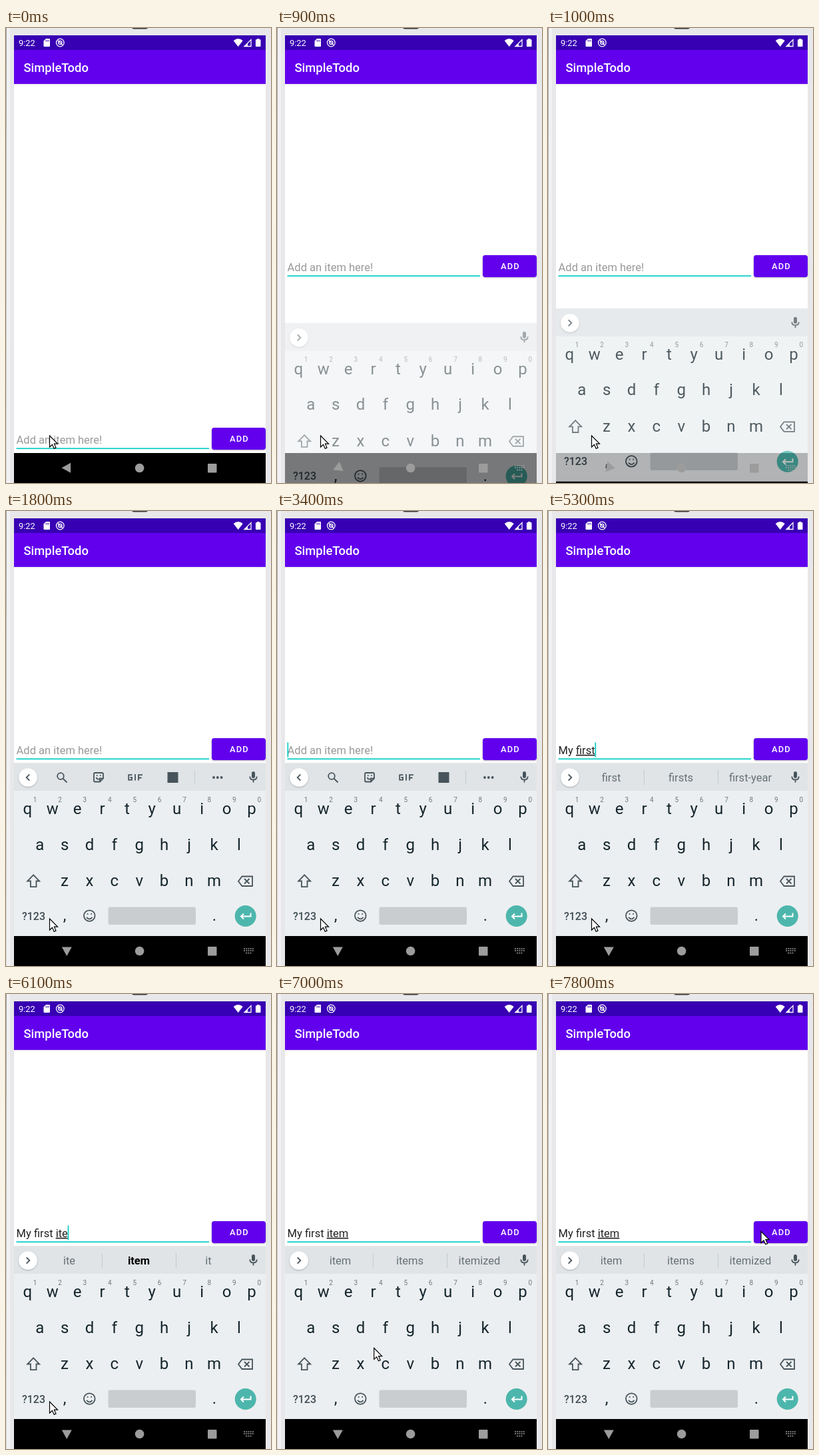
An HTML page that plays this animation: 398 by 683 pixels, repeating every 8 s.

```html
<!DOCTYPE html>
<html lang="en">
<head>
<meta charset="utf-8">
<title>Todo app</title>
<style>
  html, body { margin: 0; width: 100%; height: 100%; overflow: hidden; background: #ededef; }
  svg { display: block; width: 398px; height: 683px; }
  text { font-family: Roboto, sans-serif; white-space: pre; }
  .mid { text-anchor: middle; }
  .field { font-size: 16.5px; }
  .key { font-size: 24px; fill: #14252c; }
  .digit { font-size: 10px; fill: #70777b; }
  .line { fill: none; stroke: #47545b; stroke-width: 1.8; }
  .solid { fill: #47545b; }
  .sep { fill: #c3c9cc; }
</style>
</head>
<body>
<svg viewBox="0 0 398 683">
  <defs>
    <filter id="soft" x="-20%" y="-20%" width="140%" height="150%">
      <feDropShadow dx="0" dy="1" stdDeviation="1" flood-opacity=".28"/>
    </filter>
    <linearGradient id="edge" x2="0" y2="1">
      <stop offset="0" stop-color="#98989b"/>
      <stop offset=".3" stop-color="#b8b8bb"/>
      <stop offset="1" stop-color="#dcdcdf"/>
    </linearGradient>
  </defs>

  <!-- Device frame -->
  <rect width="398" height="683" fill="#f1f1f3"/>
  <rect x="6" width="392" height="683" fill="#e8e8ea"/>
  <rect width="1" height="683" fill="url(#edge)"/>
  <path d="M189 0h24q-1 1.5-4 1.5h-16q-3 0-4-1.5z" fill="#333"/>

  <!-- App -->
  <rect x="12" y="11" width="378" height="627" fill="#fff"/>
  <rect x="12" y="84" width="378" height="2" fill="#000" opacity=".05"/>
  <rect x="12" y="33" width="378" height="51" fill="#6200ee"/>
  <rect x="12" y="11" width="378" height="22" fill="#3700b3"/>
  <text x="26.5" y="65.8" font-size="18.4" font-weight="500" fill="#fff">SimpleTodo</text>
  <g fill="#fff">
    <text x="19" y="27" font-size="12.9">9:22</text>
    <path d="M60 16h5q1 0 1 1v10q0 1-1 1h-7.500q-1 0-1-1v-7.500z"/>
    <path d="M60 18v2.500M62 18v2.500M64 18v2.500" stroke="#3700b3" stroke-width=".9"/>
    <path d="M348.700 28l-7-9q7-6 14 0z"/>
    <path d="M368 17.500v10h-10z" fill="none" stroke="#fff" stroke-width="1.300"/>
    <path d="M363 23v4.500h-5z"/>
    <path d="M377 16h3.500v1.300h1.200q.8 0 .8.800v9.200q0 .8-.8.800h-6q-.8 0-.8-.800v-9.200q0-.8.8-.800h1.300z"/>
    <g fill="none" stroke="#fff" stroke-width="1.300">
      <circle cx="81.300" cy="22" r="5.800"/>
      <circle cx="81.300" cy="22" r="2.600"/>
      <path d="M78 18.500l7 7"/>
    </g>
  </g>

  <g id="entry">
    <rect x="15.500" y="371.300" width="289.500" height="1.800" fill="#10cfc8"/>
    <text id="hint" class="field" x="15.600" y="364.800" fill="#999">Add an item here!</text>
    <text id="typed" class="field" x="15.600" y="364.800" fill="#212121"><tspan id="done"></tspan><tspan id="word" text-decoration="underline"></tspan></text>
    <rect id="caret" y="347.500" width="1.800" height="22" fill="#10cfc8"/>
    <rect x="309" y="341" width="81" height="33" rx="3.700" fill="#6200ee" filter="url(#soft)"/>
    <text x="336" y="362.200" font-size="12.900" font-weight="500" letter-spacing="1.150" fill="#fff">ADD</text>
  </g>

  <rect x="12" y="638" width="378" height="45" fill="#000"/>

  <g id="keyboard">
    <rect x="12" y="378" width="378" height="260" fill="#eceff1"/>
    <rect x="12" y="378.500" width="378" height="41.500" fill="#e0e4e7"/>
    <g id="keys"></g>

    <circle cx="33" cy="400" r="13.800" fill="#fff" filter="url(#soft)"/>
    <path id="chevron" class="line" d="M-2.300-4.600L2.300 0L-2.300 4.600"/>
    <rect class="solid" x="369" y="391" width="5" height="10" rx="2.500"/>
    <path class="line" d="M366.300 398.500q0 5 5.200 5t5.200-5M371.500 403.500v4" stroke-width="1.500"/>

    <g id="tools">
      <circle class="line" cx="82" cy="398" r="4.800"/>
      <path class="line" d="M85.500 401.500l6 6" stroke-width="2"/>
      <path class="line" d="M134 393h10q2 0 2 2v6.500l-5 5h-7q-2 0-2-2v-9.500q0-2 2-2zM146 401.500h-5v5M135.500 400q2 4 5 2" stroke-width="1.600"/>
      <path class="line" d="M136 397h1.500M141 397h1.500"/>
      <path class="line" d="M189.500 396.200h-5.300v7.400h4.800v-3.600h-2.500M194 395v9.600M199 404.600v-8.400h6M199 400.500h4.500" stroke-width="2.200"/>
      <rect class="solid" x="242.500" y="392" width="16" height="16"/>
      <rect class="sep" x="283" y="390" width="1" height="19"/>
      <g class="solid"><circle cx="312" cy="400" r="1.900"/><circle cx="317.800" cy="400" r="1.900"/><circle cx="323.600" cy="400" r="1.900"/></g>
    </g>
    <g id="suggestions">
      <rect class="sep" x="144" y="389" width="1" height="22"/>
      <rect class="sep" x="255" y="389" width="1" height="22"/>
      <text class="mid field" x="95" y="406"></text>
      <text class="mid field" x="199.500" y="406"></text>
      <text class="mid field" x="304" y="406"></text>
    </g>

    <path class="line" d="M41.200 546.300l9 9.200h-4.700v8.700h-8.600v-8.700h-4.700z" stroke-width="1.600"/>
    <path class="line" d="M354.500 548.500h15.500v14.500h-15.500l-5.500-7.250zM358 552l7.500 7.500M365.500 552l-7.500 7.500" stroke-width="1.700"/>
    <text class="mid" x="41.500" y="613.700" font-size="16" font-weight="500" fill="#3f4d54">?123</text>
    <circle class="line" cx="125.300" cy="607.600" r="8.300"/>
    <path class="line" d="M121 609.800q4.300 5 8.600 0M121.700 604.800h1.800M127.200 604.800h1.800" stroke-width="1.700"/>
    <rect x="153.500" y="594.500" width="131.500" height="26.500" rx="2.500" fill="#c9cdd0"/>
    <circle cx="359.700" cy="608" r="16" fill="#4db6ac"/>
    <path d="M367.500 603.500v5h-14.500M357 604.500l-4 4l4 4" fill="none" stroke="#fff" stroke-width="2"/>
  </g>

  <g fill="#9c9c9c">
    <path id="back" d="M-7.700 0L5.800-7.500V7.500z"/>
    <circle cx="200.600" cy="660.500" r="6.800"/>
    <rect x="303" y="654" width="13.500" height="13.500" rx="1"/>
    <path id="switcher" d="M357 657h15M357 660h15M360 663.500h9" fill="none" stroke="#9c9c9c" stroke-width="1.700" stroke-dasharray="2 1.200"/>
  </g>

  <path id="pointer" d="M0 .500V17.500L4 13.700L6.700 19.800L9.500 18.600L6.900 12.600H12z" fill="#fff" stroke="#000" stroke-width="1.200"/>
</svg>
<script>
const $ = id => document.getElementById(id);
const LOOP = 8000, SLIDE_START = 700, SLIDE_TIME = 400;
const blinks = [300, 800, 1300, 1800, 2300, 2900, 3400, 6800, 7300, 7800];

// Time, text in the field, suggestions (* marks the bold one).
const typing = [
  [3900, "M", "M", "*My", "Maybe"],
  [4200, "My", "My", "*My", "Myself"],
  [4400, "My ", "name", "friend", "phone"],
  [4700, "My f", "f", "*friend", "first"],
  [4800, "My fi", "fi", "*first", "finally"],
  [5000, "My fir", "fir", "*first", "fire"],
  [5200, "My firs", "firs", "*first", "first-year"],
  [5300, "My first", "first", "firsts", "first-year"],
  [5500, "My first ", "time", "day", "choice"],
  [5800, "My first i", "i", "*in", "item"],
  [6000, "My first it", "it", "its", "item"],
  [6100, "My first ite", "ite", "*item", "it"],
  [6300, "My first item", "item", "items", "itemized"],
];

function addText(cls, x, y, label) {
  const node = document.createElementNS("http://www.w3.org/2000/svg", "text");
  node.setAttribute("class", "mid " + cls);
  node.setAttribute("x", x);
  node.setAttribute("y", y);
  node.textContent = label;
  $("keys").append(node);
}
[["qwertyuiop", 32.3, 455], ["asdfghjkl", 50.7, 508.6], ["zxcvbnm", 88, 563]].forEach(([row, x, y]) =>
  [...row].forEach((letter, i) => addText("key", x + 37.4 * i, y, letter)));
[..."1234567890"].forEach((digit, i) => addText("digit", 43.6 + 37.4 * i, 436.500, digit));
addText("key", 88, 615, ",");
addText("key", 313, 615, ".");

const clamp = v => Math.min(1, Math.max(0, v));
const show = (id, on) => $(id).style.display = on ? "" : "none";
const place = (id, x, y, extra = "") => $(id).setAttribute("transform", `translate(${x} ${y}) ${extra}`);
const slots = [...document.querySelectorAll("#suggestions text")];

function drawField(t) {
  const [, text, ...words] = typing.filter(step => step[0] <= t).pop() || [0, ""];
  const wordStart = text.lastIndexOf(" ") + 1;
  $("done").textContent = text.slice(0, wordStart);
  $("word").textContent = text.slice(wordStart);
  show("hint", !text);
  show("suggestions", text);
  slots.forEach((slot, i) => {
    const word = words[i] || "", bold = word[0] === "*";
    slot.textContent = bold ? word.slice(1) : word;
    slot.setAttribute("font-weight", bold ? 700 : 400);
    slot.setAttribute("fill", bold ? "#000" : "#667075");
  });
  $("caret").setAttribute("x", 15.4 + (text ? $("typed").getComputedTextLength() : 0));
  show("caret", blinks.filter(b => b <= t).length % 2);

  const toolsOpen = t >= SLIDE_START + SLIDE_TIME && !text;
  show("tools", toolsOpen);
  place("chevron", 33, 400, toolsOpen ? "scale(-1 1)" : "");
}

function draw(t) {
  drawField(t);
  const slide = clamp((t - SLIDE_START) / SLIDE_TIME);
  place("entry", 0, t < SLIDE_START ? 259 : 0);
  place("keyboard", 0, 74 * (1 - slide ** 3));
  $("keyboard").setAttribute("opacity", slide);
  show("keyboard", slide > 0);
  show("switcher", slide > 0);
  place("back", 91.3, 660.2, `rotate(${-90 * slide ** 2})`);

  const p = clamp((t - 6700) / 800), ease = p * p * (3 - 2 * p);
  const settle = t >= 7700 ? 0 : ease;
  place("pointer", 65.5 + 254.500 * ease - settle, 611.500 - 255.500 * ease + settle);
}

const start = performance.now();
function frame() {
  const t = Math.max(0, performance.now() - start) % LOOP;
  draw(Math.floor(t / 100) * 100);
  requestAnimationFrame(frame);
}
frame();
</script>
</body>
</html>
```
